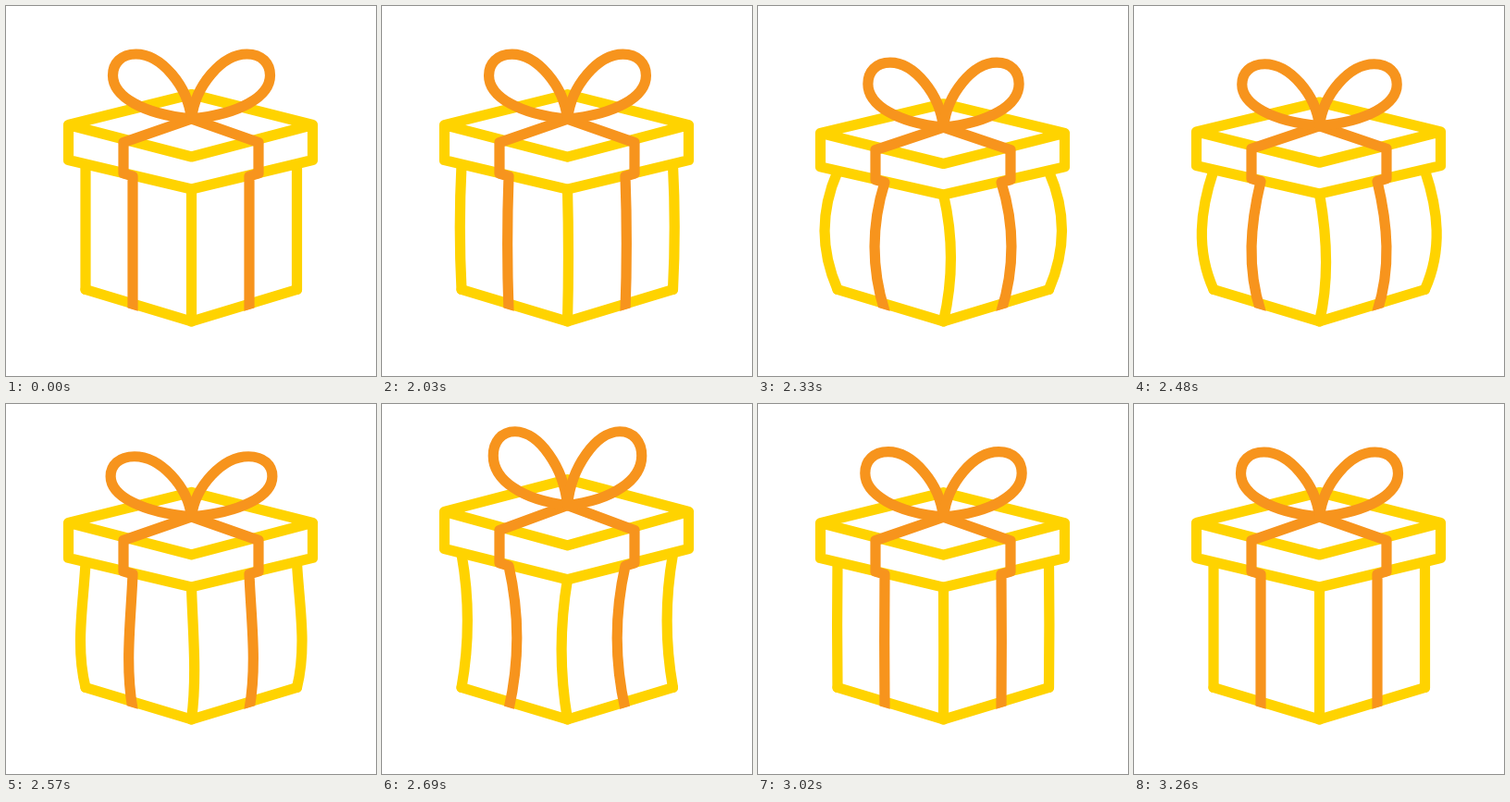
An HTML page with a canvas for the animation above (3350 ms loop, 400 px wide and 400 px high).

```html
<!DOCTYPE html>
<html lang="en">
<head>
<meta charset="utf-8">
<title>Gift box</title>
<style>
html, body { margin: 0; width: 100%; height: 100%; overflow: hidden; background: #fff; }
canvas { display: block; width: 400px; height: 400px; }
</style>
</head>
<body>
<canvas id="stage" width="400" height="400"></canvas>
<script>
const ctx = document.getElementById('stage').getContext('2d');
const LOOP = 3350, START = 2030, END = 3260, STEP = 30;
const CROUCH = 2350, RELEASE = 2570, LEAP = 2690, LAND = 2930, BOUNCE = 3110;
const YELLOW = '#ffd300', ORANGE = '#f7941d';
const FLOOR = 347, KNOT = 122, MIDDLE = 200.5;

// Cosine-eased motion through beats [time, value, power]; power > 1 delays the move.
function through(t, ...beats) {
  let [from, value] = [START - STEP, 0];
  for (const [to, goal, power = 1] of beats) {
    if (t < to) {
      const u = Math.max(0, (t - from) / (to - from)) ** power;
      return value + (goal - value) * (1 - Math.cos(Math.PI * u)) / 2;
    }
    [from, value] = [to, goal];
  }
  return value;
}

function poseAt(t) {
  const squash = through(t, [CROUCH, 1], [LEAP, -1.35, 1.8], [LAND, .12], [BOUNCE, -.08], [END, 0]);
  const bulge = through(t, [CROUCH, 1, .6], [LEAP, -.8, 2.2], [LAND, .1], [BOUNCE, -.04], [END, 0]);
  const flap = .14 * through(t, [CROUCH, 0], [RELEASE, -.5], [LEAP, 1], [LAND, 0], [BOUNCE, .1], [END, 0]);
  return {
    lift: y => FLOOR - (FLOOR - y) * (1 - .041 * squash),
    side: bulge * (bulge > 0 ? 14 : 8),
    ribbon: bulge * 11,
    middle: bulge * 8,
    sag: .7 * Math.max(0, 1 - Math.abs(t - RELEASE) / (LEAP - RELEASE)),
    bowWidth: 1 - .4 * flap - .04 * Math.max(0, squash),
    bowHeight: 1 + flap
  };
}

function stroke(color, trace) {
  ctx.strokeStyle = color;
  ctx.beginPath();
  trace();
  ctx.stroke();
}

function polyline(points) {
  points.forEach(([x, y], i) => i ? ctx.lineTo(x, y) : ctx.moveTo(x, y));
}

// Upright edge that bows sideways; sag moves the bow towards the bottom.
function upright(x, top, bottom, bulge, sag) {
  const push = bulge / .75, third = (bottom - top) / 3;
  ctx.bezierCurveTo(
    x + push * (1 - sag), top + third,
    x + push * (1 + sag * .6), bottom - third, x, bottom);
}

function drawBody({ lift, side, middle, sag }) {
  const left = 86, right = 314.5, corner = 306.5, front = 341;
  const edge = (x, top, bottom, bulge) => stroke(YELLOW, () => {
    ctx.moveTo(x, lift(top));
    upright(x, lift(top), bottom, bulge, sag);
  });
  edge(left, 172, corner, -side);
  edge(right, 172, corner, side);
  edge(MIDDLE, 198, front, middle);
  stroke(YELLOW, () => polyline([[left, corner], [MIDDLE, front], [right, corner]]));
}

function drawLid({ lift }) {
  const left = 67.5, right = 331.5, top = lift(128.5), bottom = lift(166.5);
  stroke(YELLOW, () => {
    polyline([[left, top], [MIDDLE, lift(95.5)], [right, top], [MIDDLE, lift(163)]]);
    ctx.closePath();
    polyline([[left, top], [left, bottom], [MIDDLE, lift(198)], [right, bottom], [right, top]]);
  });
}

function drawRibbon({ lift, ribbon, sag }) {
  ctx.save();
  ctx.beginPath();
  polyline([[0, 0], [400, 0], [400, 287], [200, 347], [0, 287]]);
  ctx.clip();
  for (const dir of [-1, 1]) {
    const outer = 200 + dir * 73, inner = 200 + dir * 63;
    stroke(ORANGE, () => {
      polyline([[MIDDLE, lift(KNOT)], [outer, lift(147.5)],
        [outer, lift(181)], [inner, lift(184)]]);
      upright(inner, lift(184), 330, dir * ribbon, sag);
    });
  }
  ctx.restore();
}

function drawBow({ lift, bowWidth, bowHeight }) {
  for (const dir of [-1, 1]) {
    const p = (x, y) => [MIDDLE + dir * x * bowWidth, lift(KNOT) - y * bowHeight];
    stroke(ORANGE, () => {
      ctx.moveTo(...p(0, 0));
      ctx.bezierCurveTo(...p(4, 36), ...p(33, 70), ...p(60, 70));
      ctx.bezierCurveTo(...p(76, 70), ...p(85, 60), ...p(85, 47));
      ctx.bezierCurveTo(...p(85, 24), ...p(52, 5), ...p(0, 0));
    });
  }
}

function render(now) {
  const time = now % LOOP;
  const t = time < START ? 0
    : Math.min(END, START + Math.floor((time - START) / STEP) * STEP);
  const pose = poseAt(t);

  ctx.fillStyle = '#fff';
  ctx.fillRect(0, 0, 400, 400);
  ctx.lineWidth = 11.2;
  ctx.lineJoin = ctx.lineCap = 'round';
  for (const draw of [drawBody, drawLid, drawRibbon, drawBow]) draw(pose);
}

const origin = performance.now();
function tick() {
  render(performance.now() - origin);
  requestAnimationFrame(tick);
}
tick();
</script>
</body>
</html>
```
